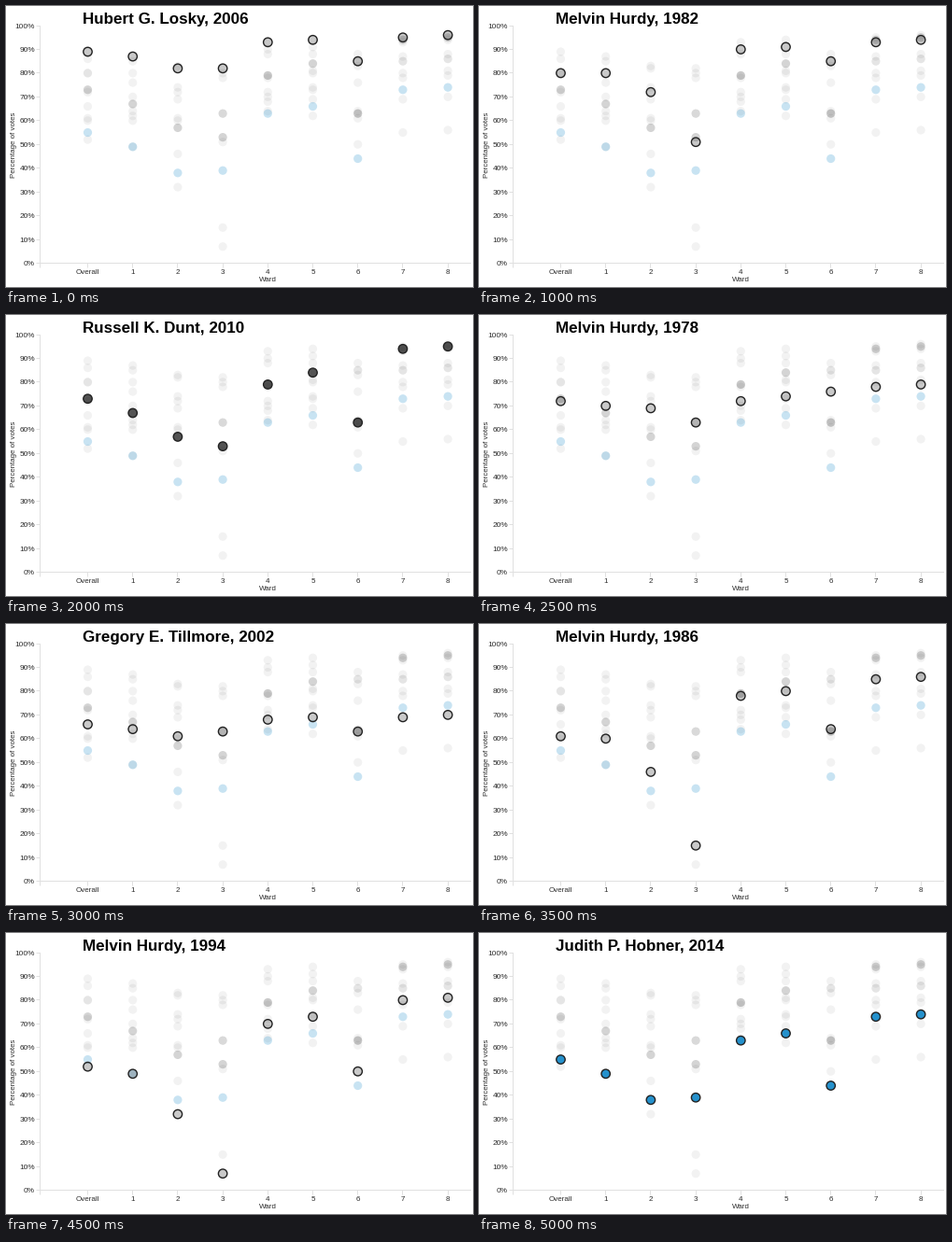
Write a matplotlib script that moves like this. It is 500 by 301 pixels and loops after 5.5 s.

```python
import math

import matplotlib.pyplot as plt
from matplotlib.animation import FuncAnimation
from matplotlib.patches import Circle

W, H, DPI = 500, 301, 64
PT = 72 / DPI  # points per pixel
STEP_MS = 500
FADE = 0.25

plt.rcParams["font.family"] = "Liberation Sans"

GREY, DARK, BLUE = ("black", 0.21), ("black", 0.67), ("#2591cc", 1.0)

# name, year, (colour, opacity), share of votes in the key wards 2, 3, 4 and 8
RACES = [
    ("Hubert G. Losky", 2006, GREY, (82, 82, 93, 96)),
    ("Lorna Quill Mabry", 1990, GREY, (83, 80, 88, 88)),
    ("Melvin Hurdy", 1982, GREY, (72, 51, 90, 94)),
    ("Edmund T. Hollingby", 1974, GREY, (74, 78, 79, 86)),
    ("Russell K. Dunt", 2010, DARK, (57, 53, 79, 95)),
    ("Melvin Hurdy", 1978, GREY, (69, 63, 72, 79)),
    ("Gregory E. Tillmore", 2002, GREY, (61, 63, 68, 70)),
    ("Melvin Hurdy", 1986, GREY, (46, 15, 78, 86)),
    ("Gregory E. Tillmore", 2002, GREY, (60, 63, 64, 56)),
    ("Melvin Hurdy", 1994, GREY, (32, 7, 70, 81)),
    ("Judith P. Hobner", 2014, BLUE, (38, 39, 63, 74)),
]

LEFT, RIGHT, TOP, BOTTOM = 36.5, 498, 21, 275.5
XS = [87.5 + 48.2 * i for i in range(9)]


def mix(a, b, t):
    return a + (b - a) * t


def shares(year, key):
    """Overall share followed by wards 1-8, blended from the key wards."""
    w2, w3, w4, w8 = key
    w1 = mix(w2, w4, 0.45)
    w5 = mix(w4, w8, 0.3)
    w6 = w1 + 0.3 * (1998 - year)  # ward 6 drifts over the years
    wards = [w1, w2, w3, w4, w5, w6, w8 - 1, w8]
    overall = (sum(wards) + w3 / 2) / 8.5  # ward 3 has the highest turnout
    return [round(v) for v in (overall, *wards)]


def y_of(pct):
    return mix(BOTTOM, TOP, pct / 100)


fig = plt.figure(figsize=(W / DPI, H / DPI), dpi=DPI, facecolor="white")
ax = fig.add_axes([0, 0, 1, 1])
ax.set_xlim(0, W)
ax.set_ylim(H, 0)
ax.axis("off")


def rule(x0, y0, x1, y1):
    ax.plot([x0, x1], [y0, y1], color="#e0e0e0", lw=PT, zorder=1,
            solid_capstyle="butt", snap=False)


def label(x, y, text, size=8, color="#2b2b2b", **kw):
    kw = {"ha": "center", "va": "baseline", **kw}
    return ax.text(x, y, text, fontsize=size * PT, color=color, **kw)


def draw_axes():
    rule(LEFT, TOP, LEFT, BOTTOM + 5)
    rule(LEFT, BOTTOM, RIGHT, BOTTOM)
    for pct in range(0, 101, 10):
        y = y_of(pct)
        tick = math.floor(y) + 0.5
        rule(LEFT - 4, tick, LEFT, tick)
        label(31, y + 2.6, f"{pct}%", 8.2, ha="right")
    for x, name in zip(XS, ["Overall", *range(1, 9)]):
        tick = math.floor(x) + 0.5
        rule(tick, BOTTOM, tick, BOTTOM + 5)
        label(x, 287, str(name))
    label(280, 295, "Ward")
    label(8.2, 149, "Percentage of votes", 7.9, va="center", rotation=90)


def dots(values, color, alpha, radius, **kw):
    return [ax.add_patch(Circle((x, y_of(v)), radius, fc=(color, alpha), **kw))
            for x, v in zip(XS, values)]


draw_axes()
title = label(82, 18.8, "", 17, "black", ha="left", weight="bold")

faded, active = [], []
for _, year, (color, alpha), key in RACES:
    values = shares(year, key)
    faded.append(dots(values, color, alpha * FADE, 4.6, lw=0, zorder=2))
    active.append(dots(values, color, alpha, 4.7, ec="#222222",
                       lw=1.4 * PT, zorder=3))


def update(frame):
    name, year, *_ = RACES[frame]
    title.set_text(f"{name}, {year}")
    for i, (dim, lit) in enumerate(zip(faded, active)):
        for dot in dim:
            dot.set_visible(i != frame)
        for dot in lit:
            dot.set_visible(i == frame)
    return [title]


anim = FuncAnimation(fig, update, frames=len(RACES), interval=STEP_MS,
                     init_func=lambda: update(0), repeat=True, repeat_delay=0)
plt.show()
```
